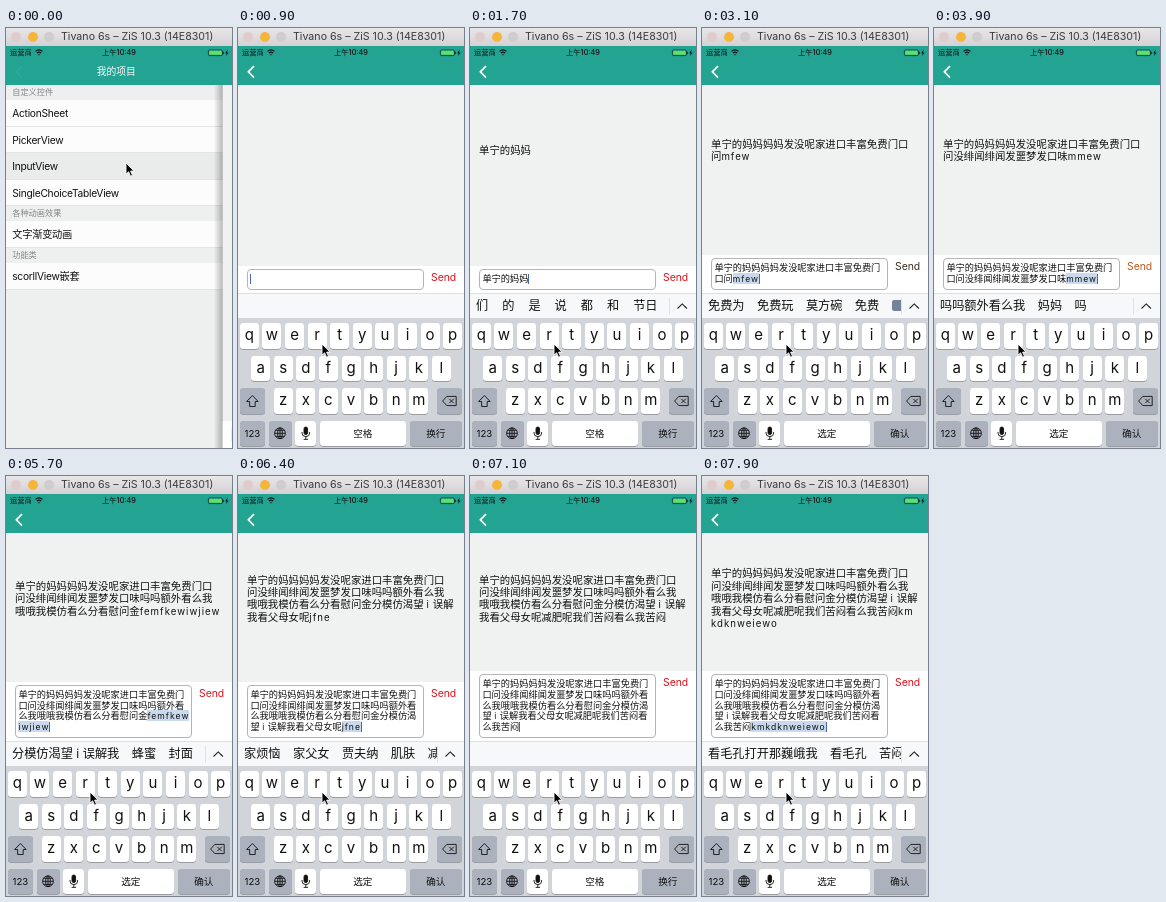
These frames come from a looping animation (226 px wide and 420 px high, 8 s). An HTML page:

```html
<!DOCTYPE html>
<html lang="zh-CN">
<head>
<meta charset="utf-8">
<title>Input view demo</title>
<style>
html, body { margin: 0; width: 100%; height: 100%; overflow: hidden; background: #fff; }
body { font-family: Inter, "Noto Sans CJK SC", "Noto Sans CJK", sans-serif; color: #111; }
#stage { position: absolute; left: 0; top: 0; width: 226px; height: 420px; overflow: hidden; }
:where(#stage div, #stage svg) { position: absolute; left: 0; top: 0; box-sizing: border-box; white-space: pre; }
.layer { width: 226px; }
#list { top: 57px; height: 363px; background: #eff1f1; }
.row { width: 226px; height: 26.5px; background: #fdfdfd; border-bottom: .6px solid #e4e5e6;
  padding-left: 9px; font-size: 10.25px; line-height: 26px; letter-spacing: -.28px; }
.row.on { background: #ebecec; }
.head { left: 9px; font-size: 8.2px; line-height: 15px; color: #85888a; }
#dim { inset: 0; background: #000; }
#page { top: 57px; height: 363px; background: #f0f2f2; }
#shade { left: -9px; width: 9px; height: 363px; background: linear-gradient(90deg, #0000, #0004); }
#label div { left: 9px; font-size: 10.4px; line-height: 12.4px; }
#bar { width: 226px; background: #fff; }
#box { left: 9px; top: 3px; width: 177px; border: .8px solid #b2b4b6; border-radius: 4px; background: #fff; }
#box div { left: 2.4px; font-size: 9.22px; line-height: 10.75px; }
.latin { font-size: .93em; letter-spacing: 1px; }
mark { background: #c9d9ee; color: inherit; }
.caret { display: inline-block; width: 1px; height: 10px; margin-right: -1px; background: #4668a8; vertical-align: -2px; }
#send { left: 193px; top: 5px; font-size: 10.4px; line-height: 14px; }
#title { width: 226px; height: 18px; background: linear-gradient(#e9e7e9, #d3d1d3);
  font-size: 10.65px; line-height: 18px; color: #3c3c3c; }
.lamp { top: 4px; width: 10px; height: 10px; border-radius: 50%; }
#nav { top: 18px; height: 39px; background: #23a493; }
.stat { font-size: 7.3px; line-height: 12px; top: 1px; }
#head { width: 226px; top: 18px; text-align: center; color: #fff; font-size: 9.8px; line-height: 16px; }
#kb { height: 155px; background: #d1d5da; }
#cands { width: 226px; height: 25px; background: #f7f8f9; border-top: .6px solid #dcdfe2; }
#words { left: 6px; width: 193px; height: 25px; overflow: hidden; font-size: 12.2px; line-height: 24px; }
#words span { display: inline-block; }
#words .chip { width: 14px; height: 11px; border-radius: 2px; background: #75839a; vertical-align: -1px; }
.key { height: 25.3px; border-radius: 3.2px; background: #fff; box-shadow: 0 .8px 0 #898c91;
  text-align: center; font-size: 15px; line-height: 23.5px; }
.key.word { font-size: 9.6px; line-height: 25px; }
.key.dark { background: #abb2bd; }
</style>
</head>
<body>
<div id="stage">
  <div id="list" class="layer"></div>
  <div id="page" class="layer">
    <div id="shade"></div>
    <div id="label"></div>
    <div id="bar"><div id="box"></div><div id="send">Send</div></div>
  </div>
  <div id="nav" class="layer">
    <div class="stat" style="left:4px">运营商</div>
    <div class="stat" style="width:226px;text-align:center;font-weight:500">上午10:49</div>
    <div id="head">我的项目</div>
    <svg width="226" height="39" fill="none" stroke="#111">
      <path d="M29.5 5.4q3.5-3 7 0M30.8 7q2.2-1.8 4.4 0" stroke-width="1.1"/>
      <path d="M31.8 8.2h2.4L33 9.6z" fill="#111" stroke="none"/>
      <rect x="202.4" y="4" width="14" height="5.6" rx="1.2" stroke-width=".6"/>
      <rect x="203.2" y="4.8" width="12.4" height="4" rx=".6" fill="#5fe06c" stroke="none"/>
      <path d="M217.3 5.8v2" stroke-width="1"/>
      <path d="M221.6 3.6l-2.4 3.6h1.5l-.6 2.8 2.4-3.6h-1.5z" fill="#111" stroke="none"/>
      <path id="back" d="M16 20l-5.6 5.8 5.6 5.8" stroke="#fff" stroke-width="1.7"/>
    </svg>
  </div>
  <div id="kb" class="layer">
    <div id="cands">
      <div id="words"></div>
      <svg id="more" width="226" height="25" fill="none" stroke="#222">
        <path d="M199.5 4v17" stroke="#d5d8db" stroke-width=".7"/>
        <path d="M207.5 14.5l4.7-4.6 4.7 4.6" stroke-width="1.1"/>
      </svg>
    </div>
  </div>
  <svg id="mouse" width="14" height="19" style="left:-2px;top:-2px">
    <path d="M2 2v11.2l2.6-2.4 1.9 4.4 2-.9-1.9-4.2h3.6z" fill="#000" stroke="#fff" stroke-width=".9"/>
  </svg>
  <div id="title">
    <div class="lamp" style="left:5px;background:#e0cdcb"></div>
    <div class="lamp" style="left:22px;background:#f5b53a"></div>
    <div class="lamp" style="left:38px;background:#cfcdcf"></div>
    <div style="left:55px">Tivano 6s – ZiS 10.3 (14E8301)</div>
  </div>
</div>
<script>
const LOOP = 8000;
const $ = id => document.getElementById(id);
const clamp = x => Math.min(1, Math.max(0, x));
const smooth = x => { x = clamp(x); return x * x * (3 - 2 * x); };

function add(parent, cls, text, style) {
  const d = document.createElement('div');
  d.className = cls;
  d.textContent = text;
  Object.assign(d.style, style);
  return parent.appendChild(d);
}

// Menu: a leading # marks a section header
let y = 0;
for (const item of ['#自定义控件', 'ActionSheet', 'PickerView', 'InputView', 'SingleChoiceTableView',
  '#各种动画效果', '文字渐变动画', '#功能类', 'scorllView嵌套']) {
  const head = item[0] === '#';
  add($('list'), head ? 'head' : item === 'InputView' ? 'row on' : 'row', head ? item.slice(1) : item, { top: y + 'px' });
  y += head ? 15.2 : 26.5;
}
const dim = add($('list'), '', '');
dim.id = 'dim';

// Keyboard
const key = (x, row, w, text, cls = '') =>
  add($('kb'), 'key ' + cls, text, { left: x + 'px', top: 30.4 + 32.5 * row + 'px', width: w + 'px' });
['qwertyuiop', 'asdfghjkl', 'zxcvbnm'].forEach((row, r) => {
  [...row].forEach((c, i) => key([1.8, 13.1, 35.7][r] + 22.6 * i, r, 19, c));
});
key(1.8, 2, 25.3, '', 'dark');
key(198.9, 2, 25.3, '', 'dark');
key(1.8, 3, 25.3, '123', 'word dark');
key(30.6, 3, 23, '', 'dark');
key(57.2, 3, 21, '');
const space = key(81.5, 3, 86.5, '', 'word');
const enter = key(171.5, 3, 52.7, '', 'word dark');
$('kb').insertAdjacentHTML('beforeend', `
<svg width="226" height="155" fill="none" stroke="#111" stroke-width=".9">
  <path d="M14.4 102.5l-5.8 6h3v5h5.6v-5h3z"/>
  <path d="M204.6 108l4.2-4.6h9.4v9.2h-9.4zM211.3 105.8l4.4 4.4m0-4.4l-4.4 4.4"/>
  <circle cx="42" cy="140.3" r="5.4"/>
  <ellipse cx="42" cy="140.3" rx="2.4" ry="5.4"/>
  <path d="M36.6 140.3h10.8M37.6 137.3h8.8M37.6 143.3h8.8M42 135v10.8"/>
  <rect x="66" y="134" width="3.6" height="7.6" rx="1.8" fill="#111"/>
  <path d="M64 139v1q0 3.6 3.8 3.6t3.8-3.6v-1M67.8 143.6v2.6M65.6 146.4h4.4"/>
</svg>`);

// start, ms per key, keys, commit time, committed text, candidates
const TYPING = [
  [950, 120, 'dndmm', 1600, '单宁的妈妈', '单宁的妈妈 单 但 当'],
  [1800, 60, 'mmfmnj', 2200, '妈妈发没呢家', '妈妈发没呢家 妈妈 没'],
  [2300, 50, 'jkffmfmkw', 2800, '进口丰富免费门口问', '进口丰富免费门口问 进口'],
  [2900, 50, 'mfewfwfemfkw', 3600, '没绯闻绯闻发噩梦发口味', '免费为 免费玩 莫方碗 免费 *'],
  [3650, 55, 'mmewkmw', 4100, '吗吗额外看么我', '吗吗额外看么我 妈妈 吗'],
  [4150, 70, 'eew', 4450, '哦哦我', '哦哦我 哦哦 饿'],
  [4650, 40, 'mfkmfkwwj', 5050, '模仿看么分看慰问金', '模仿看么分看慰问金 模仿'],
  [5080, 45, 'femfkewiwjiew', 5800, '分模仿渴望 i 误解我', '分模仿渴望ｉ误解我 蜂蜜 封面'],
  [5850, 60, 'kfmnn', 6180, '看父母女呢', '看父母女呢 看 父母'],
  [6190, 50, 'jfnewmkm', 6700, '减肥呢我们苦闷', '家烦恼 家父女 贾夫纳 肌肤 减肥'],
  [6750, 60, 'kmwkm', 7100, '看么我苦闷', '看么我苦闷 看 开门'],
  [7140, 50, 'kmkdknweiew', 9000, '', '看毛孔打开那巍峨 看毛孔 苦闷'],
  [7890, 0, 'kmkdknweiewo', 9000, '', '看毛孔打开那巍峨我 看毛孔 苦闷']
];

function typed(t) {
  let done = '', live = '', words = '';
  for (const [start, step, keys, end, text, list] of TYPING) {
    if (t < start) break;
    live = words = '';
    if (t >= end) done += text;
    else {
      live = step ? keys.slice(0, Math.floor((t - start) / step)) : keys;
      if (live) words = list;
    }
  }
  if (!live && t >= 1600 && t < 1900) words = '们 的 是 说 都 和 节日';
  return { done, live, words };
}

// Advance of a character in ems, used for line breaking
const advance = c => c > '\u2e80' ? 1 : c === ' ' ? .2 : 'ij'.includes(c) ? .3
  : c === 'f' ? .45 : c === 'm' ? .95 : c === 'w' ? .87 : .62;

function wrap(done, live, limit) {
  const lines = [['', '']];
  let used = 0;
  [...done + live].forEach((c, i) => {
    if (used + advance(c) > limit) { lines.push(['', '']); used = 0; }
    lines[lines.length - 1][i < done.length ? 0 : 1] += c;
    used += advance(c);
  });
  return lines;
}

const latin = s => s.replace(/[a-z]+/g, m => `<span class="latin">${m}</span>`);

const SEND = [[0, '#e0101c'], [2400, '#3a3026'], [3500, '#b8591f'], [4800, '#e0101c']];
let last = '';

function drawText(t) {
  const { done, live, words } = typed(t);
  const state = done + '|' + live + '|' + words;
  if (state === last) return;
  last = state;

  const big = wrap(done, live, 19.9);
  const top = 66.3 - 6.2 * big.length;
  $('label').innerHTML = big.map(([a, b], i) =>
    `<div style="top:${top + 12.4 * i}px">${latin(a + b)}</div>`).join('');

  const small = wrap(done, live, 18.65);
  const n = small.length;
  $('box').innerHTML = small.map(([a, b], i) =>
    `<div style="top:${4.2 + 10.75 * i}px">${latin(a)}${b && `<mark>${latin(b)}</mark>`}${
      i === n - 1 ? '<span class="caret"></span>' : ''}</div>`).join('');
  const h = 21 + 10.75 * (n - 1);
  $('box').style.height = h + 'px';
  $('bar').style.height = h + 6 + 'px';

  const list = words ? words.split(' ') : [];
  const gap = list.length > 5 ? 14 : 12.4;
  $('words').innerHTML = list.map(w =>
    `<span ${w === '*' ? 'class="chip"' : ''} style="margin-right:${gap}px">${
      w === '*' ? '' : w.replace('ｉ', ' i ')}</span>`).join('');
  $('more').style.opacity = words ? 1 : 0;
  space.textContent = live ? '选定' : '空格';
  enter.textContent = live ? '确认' : '换行';
}

function draw(t) {
  const push = smooth((t + 60) / 500);
  const rise = 1 - (1 - clamp((t - 450) / 400)) ** 3;
  const move = smooth((t - 150) / 650);
  drawText(t);

  $('list').style.transform = $('head').style.transform = `translateX(${-67.8 * push}px)`;
  dim.style.opacity = .1 * push;
  $('head').style.opacity = 1 - push;
  $('back').style.opacity = push;
  $('page').style.transform = `translateX(${226 * (1 - push)}px)`;
  $('shade').style.opacity = push < 1 ? 1 : 0;

  const kbTop = 420 - 155 * rise;
  $('kb').style.top = kbTop + 'px';
  $('bar').style.top = kbTop - 57 - parseFloat($('bar').style.height) + 'px';
  $('mouse').style.transform = `translate(${120 - 36 * move}px, ${135 + 181 * move}px)`;
  $('send').style.color = SEND.filter(s => t >= s[0]).pop()[1];
}

const t0 = performance.now();
function tick() {
  draw((performance.now() - t0) % LOOP);
  requestAnimationFrame(tick);
}
tick();
</script>
</body>
</html>
```
